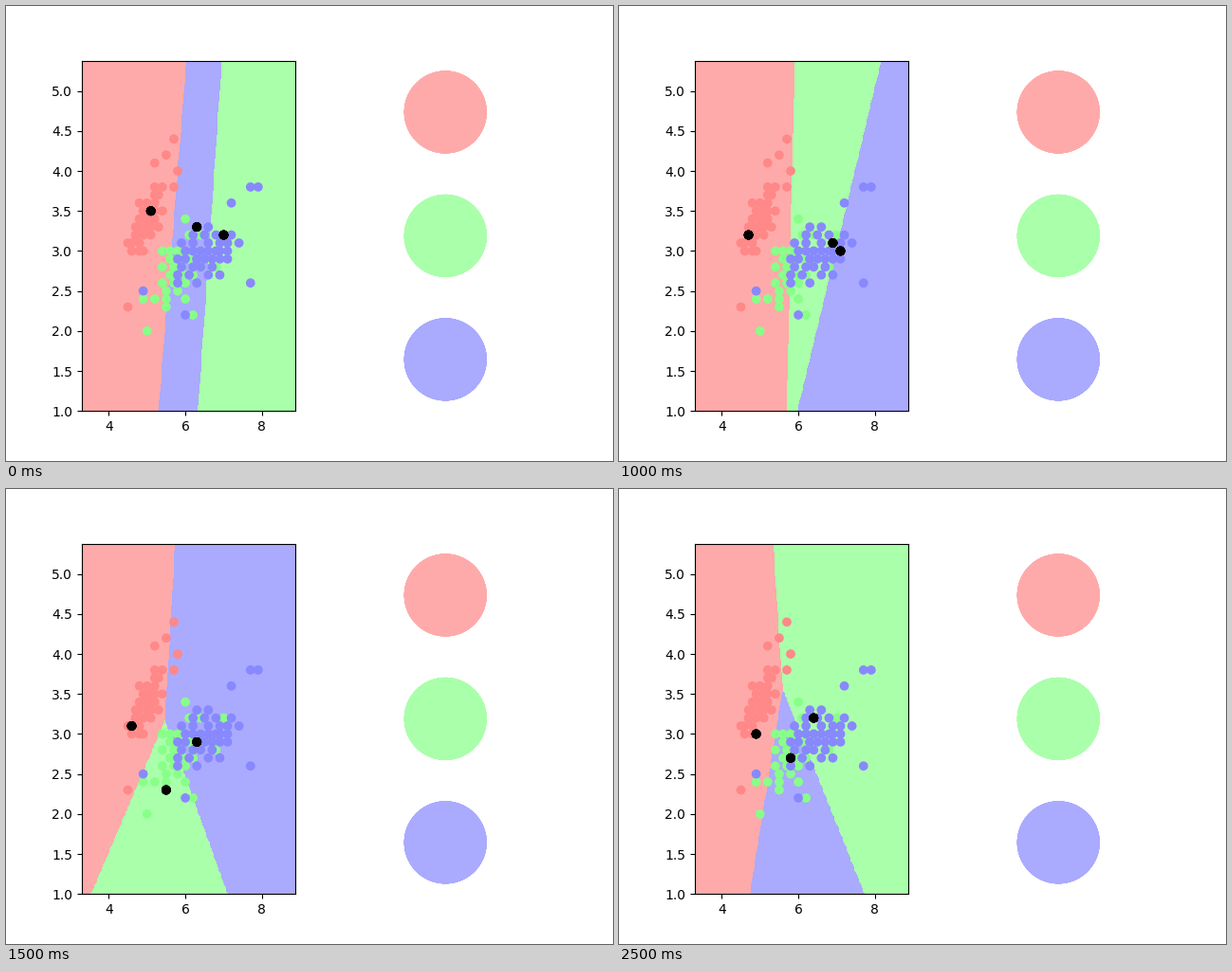
Recreate the animation shown at these times as a matplotlib script. Size 640 by 480 pixels, loop 3 s.

```python
import numpy as np
import matplotlib.pyplot as plt
from matplotlib.animation import FuncAnimation
from matplotlib.colors import ListedColormap

REGION = ["#ffaaaa", "#aaffaa", "#aaaaff"]
DOT = ["#ff8888", "#88ff88", "#8888ff"]
STEP = 0.02
OVERDRAW = 8  # repeated drawing hardens the edges

# One training sample per class (red, green, blue).
SAMPLES = np.array([
    [(5.1, 3.5), (7.0, 3.2), (6.3, 3.3)],
    [(4.9, 3.0), (6.4, 3.2), (5.8, 2.7)],
    [(4.7, 3.2), (6.9, 3.1), (7.1, 3.0)],
    [(4.6, 3.1), (5.5, 2.3), (6.3, 2.9)],
])
ORDER = [0, 1, 2, 3, 2, 1]

# Points standing apart from each class's core.
OUTLIERS = [
    [(4.5, 2.3), (5.2, 4.1), (5.5, 4.2), (5.7, 4.4), (5.8, 4.0), (5.7, 3.8)],
    [(5.0, 2.0), (4.9, 2.4), (5.4, 3.0), (6.0, 3.4), (6.2, 2.2), (6.8, 2.8)],
    [(4.9, 2.5), (6.0, 2.2), (7.7, 2.6), (7.2, 3.6), (7.7, 3.8), (7.9, 3.8)],
]


def core(n, mean, spread, corr):
    """Correlated bell-shaped cloud on a golden-angle spiral, in 0.1 steps."""
    k = np.arange(n)
    r = np.sqrt(-2 * np.log(1 - 0.86 * (k + 0.5) / n))
    angle = k * np.pi * (3 - np.sqrt(5))
    u, v = r * np.cos(angle), r * np.sin(angle)
    v = corr * u + np.sqrt(1 - corr ** 2) * v
    cloud = np.column_stack([u, v]) * spread + mean
    return np.unique(cloud.round(1), axis=0)


CORES = [
    core(32, (4.98, 3.38), (0.27, 0.27), 0.7),
    core(28, (5.83, 2.74), (0.36, 0.25), 0.5),
    core(36, (6.5, 2.95), (0.48, 0.21), 0.35),
]

xs = 3.3 + STEP * np.arange(280)
ys = 1.0 + STEP * np.arange(220)
gx, gy = np.meshgrid(xs, ys)


def nearest(samples):
    """Class of the closest sample for every grid cell."""
    dist = [(gx - x) ** 2 + (gy - y) ** 2 for x, y in samples]
    return np.argmin(dist, axis=0)


fig = plt.figure(figsize=(6.4, 4.8), dpi=100)
ax = fig.add_subplot(1, 2, 1)
mesh = ax.pcolormesh(xs, ys, nearest(SAMPLES[0]), cmap=ListedColormap(REGION),
                     vmin=0, vmax=2, shading="nearest")

groups = [np.vstack([CORES[c], OUTLIERS[c], SAMPLES[:, c]]) for c in range(3)]
labels = np.repeat(range(3), [len(g) for g in groups])
ax.scatter(*np.vstack(groups).T, c=labels, cmap=ListedColormap(DOT))

stack = np.tile(SAMPLES[0], (OVERDRAW, 1))
marks = ax.scatter(*stack.T, c=["black"] * len(stack))
ax.set_xlim(xs[0], xs[-1])
ax.set_ylim(ys[0], ys[-1])

for row, color in enumerate(REGION):
    pie_ax = fig.add_subplot(3, 2, 2 * row + 2)
    for _ in range(OVERDRAW):
        pie_ax.pie([1], colors=[color])


def update(i):
    samples = SAMPLES[ORDER[i]]
    mesh.set_array(nearest(samples))
    marks.set_offsets(np.tile(samples, (OVERDRAW, 1)))
    return mesh, marks


anim = FuncAnimation(fig, update, frames=len(ORDER), interval=500,
                     repeat=True, repeat_delay=0)
plt.show()
```
